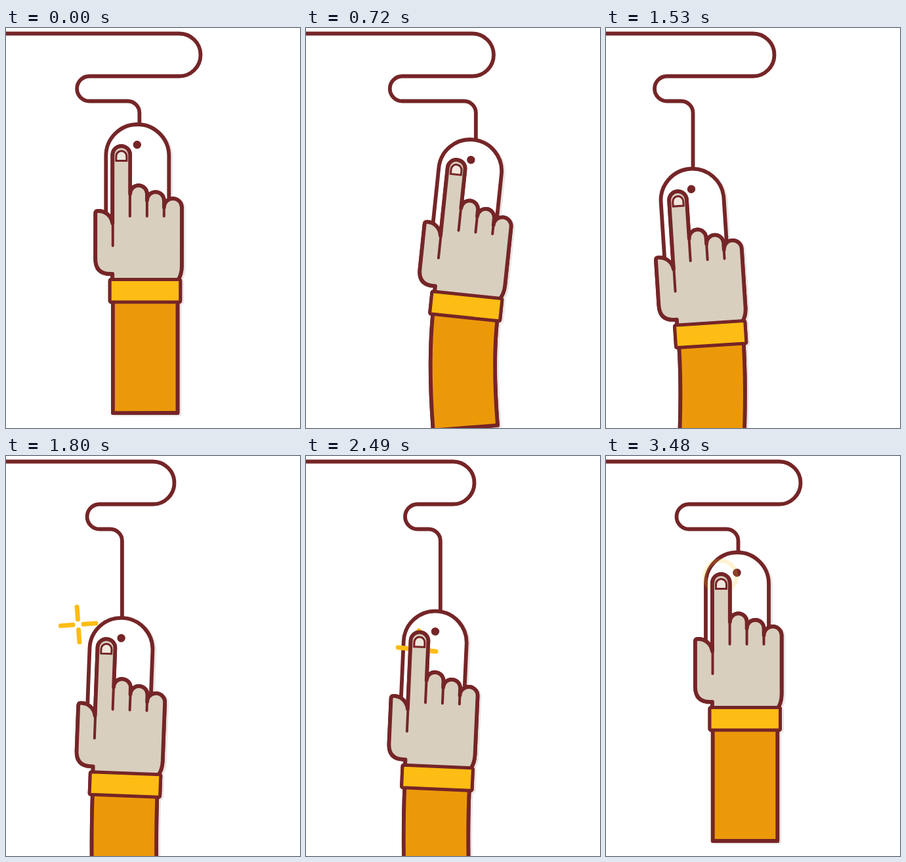
These frames come from a looping animation (448 by 610 pixels, 3.51 s). An HTML page:

```html
<!DOCTYPE html>
<html lang="en">
<head>
<meta charset="utf-8">
<title>Hand and mouse</title>
<style>
  html, body { margin: 0; width: 100%; height: 100%; overflow: hidden; background: #fff; }
  svg { display: block; width: 448px; height: 610px; }
  path, rect { stroke: #752527; stroke-width: 5.8; stroke-linejoin: round; }
  .crease { fill: none; stroke-width: 4; stroke-linecap: round; }
  #cable { fill: none; }
  #shaded { filter: drop-shadow(3.5px 2.5px 0 rgba(70, 40, 30, .12)); }
  #clicks { fill: none; stroke: #fdbd14; stroke-linecap: round; }
  #clicks path { stroke: inherit; stroke-width: 7; }
  #clicks circle { stroke-width: 6.3; }
</style>
</head>
<body>
<svg viewBox="0 0 448 610">
  <defs>
    <g id="hand">
      <path id="sleeve" fill="#ec9909"/>
      <path fill="#d8cfbf" d="M162 384V375H158Q136 375 136 352V283Q136 279 140 279C151 279 160 286 162 298V193.5a13.4 13.4 0 0 1 26.8 0V253a12.9 12.9 0 0 1 25.8 0V263a13 13 0 0 1 26 0V273.5a13.5 13.5 0 0 1 27 0V363Q267.5 376 262 384"/>
      <path class="crease" d="M162.5 290V332M188.6 250V287M214.6 254V287M240.5 264V287"/>
      <path fill="#eee7dd" style="stroke-width:3;stroke-linejoin:miter" d="M167.5 202.5V195.5a8 8 0 0 1 16 0V202.5Z"/>
      <rect x="158" y="383.5" width="107.5" height="34.5" rx="2" fill="#fdbd14" style="stroke-width:5"/>
    </g>
  </defs>
  <path id="cable"/>
  <g id="shaded">
    <g class="rig">
      <g id="mouse">
        <path fill="#fff" d="M152 340V195a48 48 0 0 1 96 0V340Z"/>
        <circle cx="199.5" cy="178" r="6.2" fill="#752527"/>
      </g>
      <use href="#hand"/>
    </g>
  </g>
  <g id="clicks"></g>
  <g class="rig"><use href="#hand"/></g>
</svg>
<script>
const LOOP = 3510;
// Moments when the hand reaches the right, the left, the lowest point and home
const RIGHT = 585, LEFT = 1545, LOW = 2180, HOME = 3180;
// start time, x, y, tilt
const clicks = [[820, 275, 198, 7], [1740, 110, 257, -4], [2390, 169, 295, 6], [3150, 174.5, 183.5, 0]];

const byId = id => document.getElementById(id);
const rigs = document.querySelectorAll(".rig");

const ramp = (t, from, to) => Math.min(1, Math.max(0, (t - from) / (to - from)));
const easeOut = u => 1 - (1 - u) ** 2;
const smooth = u => u * u * (3 - 2 * u);

function poseAt(t) {
  const toRight = easeOut(ramp(t, 0, RIGHT));
  const toLeft = easeOut(ramp(t, RIGHT, LEFT));
  const toLow = easeOut(ramp(t, LEFT, LOW));
  const toHome = ramp(t, LOW, HOME);
  const cableHome = smooth(ramp(t, 2490, HOME));
  const swing = Math.sin(Math.PI * toHome);
  const sink = ramp(t, 310, LEFT) ** 1.1;
  return {
    x: 175 + 98 * toRight - 164.5 * toLeft + 69 * toLow - 2.5 * toHome - 4.5 * swing,
    y: 184 + 70 * sink + 45 * toLow - 115 * smooth(toHome),
    tilt: 9.4 * toRight - 13.1 * toLeft + 9.1 * toLow - 5.4 * easeOut(toHome),
    mouseShift: -3.4 * Math.sin(Math.PI * Math.sqrt(ramp(t, 0, LOOP))) ** 2,
    bendRight: 296.5 - 40 * toLeft + 40 * cableHome,
    bendLeft: 108 + 39 * toRight - 73 * toLeft + 77 * toLow - 43.5 * cableHome,
    cableEnd: 203 + 101 * toRight - 171.5 * toLeft + 69 * toLow + 4 * swing
  };
}

function sleevePath(tilt) {
  const bend = tilt * 1.75 * Math.PI / 180, half = 49.25, midX = 212, midY = 487;
  const side = (x, y, angle, d) => `${x + d * Math.cos(angle)} ${y - d * Math.sin(angle)}`;
  const x = midX + 100 * Math.sin(bend), y = midY + 100 * Math.cos(bend);
  return `M${midX - half} 416Q${side(midX, midY, bend / 2, -half)} ${side(x, y, bend, -half)}` +
    `L${side(x, y, bend, half)}Q${side(midX, midY, bend / 2, half)} ${midX + half} 416Z`;
}

function cablePath(right, left, end, bottom) {
  return `M-5 8.5H${right - 32.5}a32.5 32.5 0 0 1 0 65H${left + 19}a19 19 0 0 0 0 38` +
    `H${end - 18}a18 18 0 0 1 18 18V${bottom}`;
}

// Rays shoot out first, then a ring grows and fades
function clickMarkup(t, [start, x, y, tilt]) {
  const p = t - start;
  if (p <= 0 || p > 350) return "";
  const outer = 8 + 21 * easeOut(ramp(p, 0, 90)), inner = 8 + 21 * easeOut(ramp(p, 90, 190));
  let shapes = "";
  if (p < 180) {
    for (let a = 0; a < 360; a += 90) {
      shapes += `<path d="M${inner} 0H${outer}" transform="rotate(${a})"/>`;
    }
  }
  if (p > 150) {
    shapes += `<circle r="${11 + 0.13 * (p - 230)}" opacity="${1 - ramp(p, 250, 350)}"/>`;
  }
  return `<g transform="translate(${x} ${y}) rotate(${tilt})">${shapes}</g>`;
}

function draw(t) {
  const { x, y, tilt, mouseShift, bendRight, bendLeft, cableEnd } = poseAt(t);
  for (const rig of rigs) {
    rig.setAttribute("transform", `translate(${x} ${y}) rotate(${tilt}) translate(-175 -184)`);
  }
  byId("mouse").setAttribute("transform", `translate(${mouseShift} 0)`);
  byId("sleeve").setAttribute("d", sleevePath(tilt));
  byId("cable").setAttribute("d", cablePath(bendRight, bendLeft, cableEnd, y - 34));
  byId("clicks").innerHTML = clicks.map(c => clickMarkup(t, c)).join("");
}

const began = performance.now();
function tick() {
  draw((performance.now() - began) % LOOP);
  requestAnimationFrame(tick);
}
tick();
</script>
</body>
</html>
```
